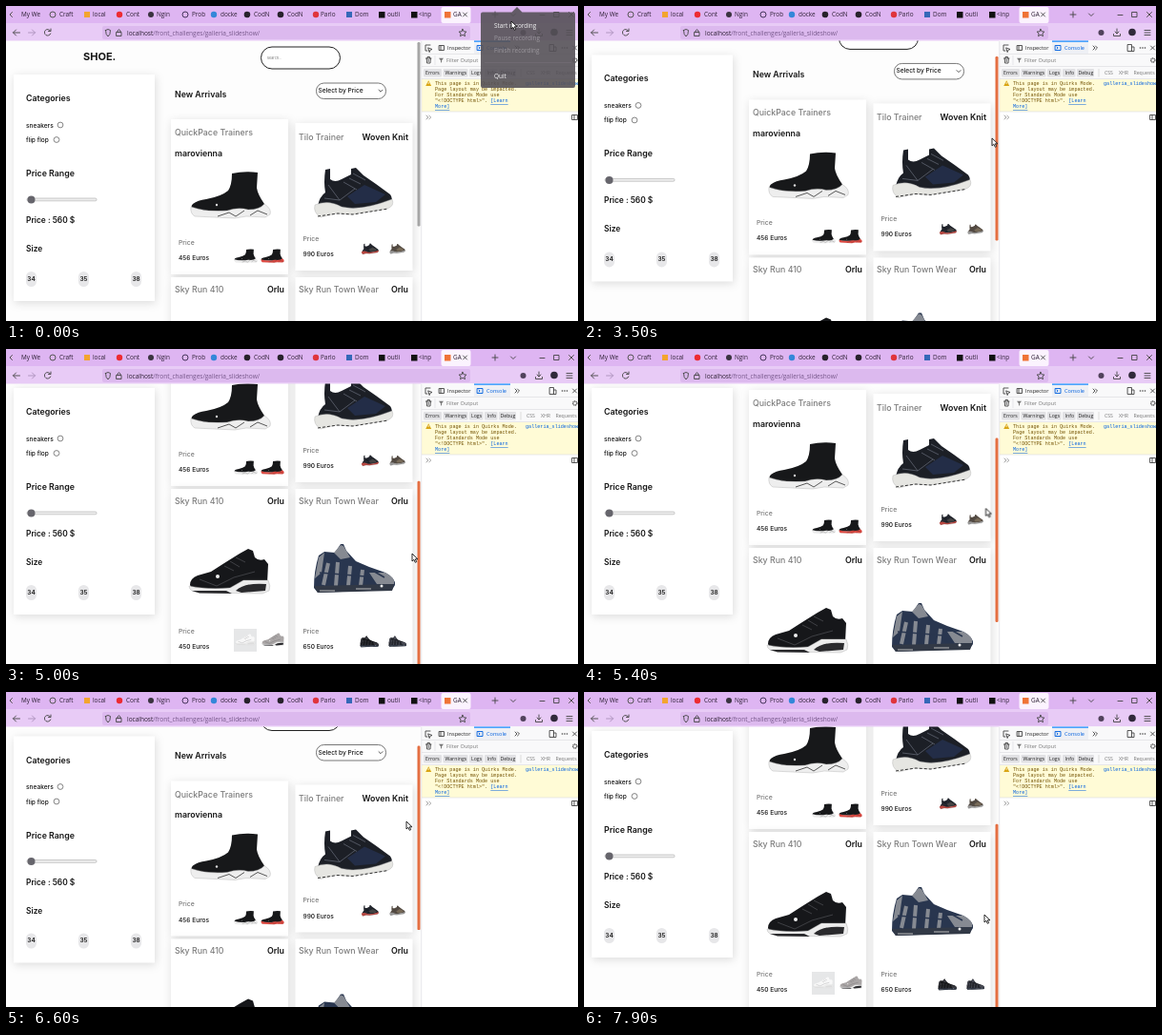
An HTML page for the animation above (8000 ms loop, 600 by 331 pixels).

```html
<!DOCTYPE html>
<html lang="en">
<head>
<meta charset="utf-8">
<title>Shoe shop</title>
<style>
@property --s { syntax: "<number>"; inherits: true; initial-value: 0; }
html, body { margin: 0; width: 600px; height: 331px; overflow: hidden; background: #fdfdfd; }
svg { display: block; animation: scroll 8s infinite; }
text { dominant-baseline: central; font: 6px "Open Sans", sans-serif; fill: #222; white-space: pre; }
.line { fill: none; stroke: #444; stroke-width: .9; stroke-linecap: round; }

/* shop page */
.shop text { font: 500 6.6px Inter, sans-serif; fill: #151515; }
.shop .h { font-size: 8.8px; font-weight: 600; }
.shop .name { font-size: 8.8px; fill: #7d7d7d; }
.shop .price { fill: #777; font-size: 6.8px; }
.shop .size { font-weight: 600; font-size: 6.4px; text-anchor: middle; }
.shop .r { text-anchor: end; }
.card { fill: #fff; filter: drop-shadow(1px 2px 5px #0002); }
.main { transform: translateY(calc(var(--s) * -1px)); }
.side { transform: translateY(max(-31px, calc(var(--s) * -1px))); }
.thumb { transform: translateY(calc(var(--s) * .73px)); animation: thumb 8s step-end infinite; }

/* browser */
.tabs text { font-size: 6.4px; fill: #2c1f33; }
.tools text { font-size: 5.6px; }
.tools .chip { font-size: 5.2px; }
.tools .dim { fill: #777; }
.tools .code { font: 5.12px "Liberation Mono", monospace; fill: #715100; }
.tools .link { fill: #0060df; }
.prompt { animation: prompt 8s step-end infinite; }
.edge { animation: edge 8s step-end infinite; }
.menu { animation: menu 8s step-end infinite; }
.menu text { font-size: 6.4px; fill: #f4f4f4; }
.menu .off { fill: #9b979d; }
.cursor { animation: move 8s infinite; }

@keyframes scroll {
  0% { --s: 0; }
  41.25% { --s: 0; animation-timing-function: steps(7); }
  50% { --s: 72; animation-timing-function: steps(7); }
  58.75% { --s: 138; }
  62.5% { --s: 138; animation-timing-function: steps(8); }
  72.5% { --s: 14; animation-timing-function: steps(2); }
  75% { --s: 0; }
  78.75% { --s: 0; animation-timing-function: steps(3); }
  82.5% { --s: 25.5; animation-timing-function: steps(11); }
  96.25%, 100% { --s: 138; }
}
@keyframes move {
  0% { transform: translate(530px, 16px); animation-timing-function: steps(9); }
  11.25% { transform: translate(440px, 62px); animation-timing-function: steps(5); }
  17.5% { transform: translate(30px, 215px); animation-timing-function: steps(4); }
  22.5% { transform: translate(224px, 196px); animation-timing-function: steps(2); }
  25% { transform: translate(264px, 179px); animation-timing-function: steps(7); }
  33.75% { transform: translate(428px, 140px); animation-timing-function: steps(5); }
  40% { transform: translate(428px, 124px); }
  41.25% { transform: translate(428px, 124px); animation-timing-function: steps(7); }
  50% { transform: translate(428px, 176px); animation-timing-function: steps(7); }
  58.75% { transform: translate(427px, 219px); }
  60% { transform: translate(427px, 219px); animation-timing-function: steps(2); }
  62.5% { transform: translate(426px, 215px); animation-timing-function: steps(8); }
  72.5% { transform: translate(417px, 120px); animation-timing-function: steps(2); }
  75% { transform: translate(418px, 112px); }
  78.75% { transform: translate(418px, 112px); animation-timing-function: steps(3); }
  82.5% { transform: translate(420px, 136px); animation-timing-function: steps(13); }
  98.75%, 100% { transform: translate(420px, 234px); }
}
@keyframes thumb { 0% { fill: #a6a6a6; } 2.5% { fill: #ee8866; } 35%, 100% { fill: #e46f42; } }
@keyframes prompt { 0% { stroke: #999; } 2.5% { stroke: #0074e8; } 35%, 100% { stroke: #999; } }
@keyframes edge { 0% { opacity: 0; } 2.5% { opacity: 1; } 42.5%, 100% { opacity: 0; } }
@keyframes menu { 0% { opacity: 1; } 2.5%, 100% { opacity: 0; } }
</style>
</head>
<body>
<svg width="600" height="331" viewBox="0 0 600 331">
<defs>
  <g id="sock">
    <path fill="#17181a" d="M45 2Q58-1 72 1L71 17Q72 24 79 34L80 42 4 41Q1 37 4 34 9 30 18 29 34 26 41 20 45 14 45 2Z"/>
    <path fill="var(--sole,#eee)" stroke="#aaa" stroke-width=".4" d="M2 37Q20 43 40 41 52 37 62 40 74 40 79 34 87 39 85 45L80 48 60 47 48 49 6 47Q1 44 2 37Z"/>
    <path fill="none" stroke="#333" stroke-width=".8" d="M30 47 42 43 49 47 58 41M64 46 72 41 82 45"/>
    <circle cx="29" cy="35" r="1.2" fill="#ddd"/>
  </g>
  <g id="runner">
    <path fill="var(--up,#1c1f26)" d="M5 40Q7 30 13 26 11 15 13 2L18 1 18 12Q23 16 30 12L40 7 40 1 45 0 53 8 66 17 81 28Q84 32 82 38L40 44Z"/>
    <path fill="var(--panel,#232d47)" d="M36 30 54 18 76 28 66 36 44 38Z"/>
    <path fill="none" stroke="#606571" stroke-width=".8" d="M38 11 50 17M32 15 46 23M42 6 55 13M16 18 28 34 44 22M12 32 28 34"/>
    <path fill="var(--sole,#e6e6e2)" stroke="#aaa" stroke-width=".4" d="M2 39Q16 33 30 41 50 46 83 33 86 40 78 43L40 49 24 48 8 52Q0 47 2 39Z"/>
    <path fill="none" stroke="#333" stroke-dasharray="3 2" d="M5 51 26 48 42 49 79 43"/>
  </g>
  <g id="low">
    <path fill="var(--up,#16171a)" d="M2 38Q2 31 10 28L24 24 38 15 54 5 63 0 68 2 70 9Q74 13 80 11L84 16 83 36 40 44 4 42Z"/>
    <path fill="none" stroke="#4a4b50" stroke-width=".8" d="M38 18 48 23M44 13 54 19M50 9 60 14M12 32 30 39 48 30 70 24"/>
    <path fill="var(--sole,#ececec)" stroke="#aaa" stroke-width=".4" d="M1 39Q20 43 44 41L58 33 84 33Q87 39 85 44L78 47 12 46Q1 45 1 39Z"/>
    <path fill="var(--air,#2a2a2d)" d="M50 44Q60 35 82 37L81 44 56 46ZM4 44 40 44 46 47 12 46.500Z"/>
    <circle cx="31" cy="29" r="2" fill="#eee"/>
  </g>
  <g id="high">
    <path fill="var(--up,#29364f)" d="M2 48Q2 30 7 14L13 10 24 11 30 2 33 2 36 9 46 20 60 26 77 32Q88 38 87 45L84 50 6 53Z"/>
    <path fill="var(--panel,#868a92)" d="M23 11 30 3 33 4 40 16 30 18ZM60 32 77 32Q88 38 86 44L68 44ZM7 16 13 11 10 32 3 38Z"/>
    <path fill="none" stroke="var(--panel,#868a92)" stroke-width="4" d="M12 45 17 22M25 46 27 21M38 46 40 25M51 46 53 29"/>
    <path fill="none" stroke="var(--up,#29364f)" stroke-width="1.500" d="M8 32 56 36M44 19 40 24M62 29 76 37"/>
    <path fill="#323946" d="M2 46 86 44 84 51 6 53Z"/>
    <path fill="none" stroke="#bbb" d="M8 51 24 51M46 49 62 49"/>
    <circle cx="73" cy="46" r="1.500" fill="#eee"/>
  </g>
</defs>

<rect width="600" height="331" fill="#fdfdfd"/>

<g class="shop">
  <g class="main">
    <text x="81" y="53" style="font-size:11px;font-weight:700">SHOE.</text>
    <rect x="267.5" y="43" width="83" height="23" rx="11.5" fill="#fff" stroke="#222"/>
    <text x="274" y="54.5" style="font-size:3.7px;fill:#888">search...</text>
    <text class="h" x="177" y="92">New Arrivals</text>
    <rect x="325.5" y="81" width="73" height="16.5" rx="8" fill="#fff" stroke="#555" stroke-width=".8"/>
    <text x="327.5" y="89">Select by Price</text>
    <path class="line" d="M391 88.2l2 2 2-2"/>

    <rect class="card" x="173" y="119" width="123" height="163"/>
    <text class="name" x="177" y="132.5">QuickPace Trainers</text>
    <text class="h" x="177" y="154">marovienna</text>
    <use href="#sock" x="192" y="174"/>
    <text class="price" x="181" y="248">Price</text>
    <text x="181" y="265">456 Euros</text>
    <use href="#sock" transform="translate(239 255.5) scale(.29)"/>
    <use href="#sock" transform="translate(267 255.5) scale(.29)" style="--sole:#e0473f"/>

    <rect class="card" x="303.5" y="123" width="123" height="155"/>
    <text class="name" x="307" y="137">Tilo Trainer</text>
    <text class="h r" x="422" y="137">Woven Knit</text>
    <use href="#runner" x="322" y="170"/>
    <text class="price" x="311.5" y="244">Price</text>
    <text x="311.5" y="261">990 Euros</text>
    <use href="#runner" transform="translate(372.5 249.5) scale(.22)" style="--sole:#b9453f;--panel:#444"/>
    <use href="#runner" transform="translate(402 250) scale(.2)" style="--up:#51483f;--panel:#776a58;--sole:#999"/>

    <rect class="card" x="173" y="285" width="123" height="200"/>
    <text class="name" x="177" y="297">Sky Run 410</text>
    <text class="h r" x="292" y="297">Orlu</text>
    <use href="#low" x="191" y="348"/>
    <text class="price" x="181" y="434.5">Price</text>
    <text x="181" y="451">450 Euros</text>
    <rect x="239" y="432" width="24" height="24" fill="#e6e7e8"/>
    <use href="#low" transform="translate(240.5 437.5) scale(.24)" style="--up:#f8f8f8;--air:#ddd"/>
    <use href="#low" transform="translate(268 436.5) scale(.28)" style="--up:#aaa6a6"/>

    <rect class="card" x="303.5" y="285" width="123" height="200"/>
    <text class="name" x="307" y="297">Sky Run Town Wear</text>
    <text class="h r" x="422" y="297">Orlu</text>
    <use href="#high" x="321" y="341"/>
    <text class="price" x="311.5" y="434.5">Price</text>
    <text x="311.5" y="451">650 Euros</text>
    <use href="#high" transform="translate(371 439) scale(.23)" style="--up:#17181b;--panel:#3a3a40"/>
    <use href="#high" transform="translate(401 439) scale(.22)" style="--up:#24262c;--panel:#4b4d57"/>
  </g>

  <g class="side">
    <rect class="card" x="8" y="72" width="148" height="238"/>
    <text class="h" x="21" y="96.5">Categories</text>
    <text x="21" y="125.5">sneakers</text>
    <text x="21" y="141">flip flop</text>
    <g fill="#fff" stroke="#666" stroke-width=".8">
      <circle cx="57" cy="125" r="2.9"/>
      <circle cx="53" cy="140.5" r="2.9"/>
      <rect x="22" y="202" width="73" height="2.8" rx="1.2" fill="#eee" stroke="#aaa" stroke-width=".6"/>
    </g>
    <text class="h" x="21" y="175.5">Price Range</text>
    <circle cx="26.5" cy="203.5" r="4" fill="#66656c"/>
    <text class="h" x="21" y="225" style="font-size:8.4px">Price : 560 $</text>
    <text class="h" x="21" y="255" style="font-size:8.4px">Size</text>
    <g fill="#e7e7e9">
      <rect x="21" y="279" width="11" height="16" rx="5.5"/>
      <rect x="76" y="279" width="11" height="16" rx="5.5"/>
      <rect x="131" y="279" width="11" height="16" rx="5.5"/>
    </g>
    <text class="size" x="26.5" y="286.5">34</text>
    <text class="size" x="81.5" y="286.5">35</text>
    <text class="size" x="136.5" y="286.5">38</text>
  </g>
  <rect class="thumb" x="431.5" y="38" width="3" height="193.5" rx="1.2"/>
</g>

<g class="tabs">
  <rect width="600" height="18" fill="#deb5f2"/>
  <rect y="18" width="600" height="18.5" fill="#e8cbf6"/>
  <rect x="456.500" y="1" width="31" height="17" rx="2" fill="#fbf3fe"/>
  <path class="line" d="M6.5 6.500l-2.500 2.500 2.500 2.500M479.500 7l4 4m0-4l-4 4M510 9h6m-3-3v6M529.500 8l2.500 2.500 2.500-2.500M560 9.500h5M575 6.500h5v5h-5zM590.500 6.500l5 5m0-5l-5 5"/>
  <text x="16" y="8.700">My We</text>
  <circle cx="49" cy="9" r="3" fill="none" stroke="#555"/><text x="56" y="8.700">Craft</text>
  <rect x="82" y="6" width="6" height="6" fill="#f3a52f"/><text x="91" y="8.700">local</text>
  <circle cx="119" cy="9" r="3.200" fill="#ed2b32"/><text x="126" y="8.700">Cont</text>
  <circle cx="152" cy="9" r="3" fill="#3a3340"/><text x="158" y="8.700">Ngin</text>
  <circle cx="188" cy="9" r="3" fill="none" stroke="#45345a"/><text x="195" y="8.700">Prob</text>
  <circle cx="218" cy="9" r="3.200" fill="#3487d9"/><text x="225" y="8.700">docke</text>
  <circle cx="253" cy="9" r="3.300" fill="#27212b"/><text x="260" y="8.700">CodN</text>
  <circle cx="288" cy="9" r="3.300" fill="#27212b"/><text x="295" y="8.700">CodN</text>
  <circle cx="325" cy="9" r="3.200" fill="#e0343c"/><text x="330" y="8.700">Parlo</text>
  <rect x="357" y="6" width="6" height="6" fill="#3568b8"/><text x="366" y="8.700">Dom</text>
  <rect x="391" y="6" width="6.500" height="6.500" fill="#111"/><text x="400" y="8.700">outli</text>
  <rect x="425" y="6" width="6.500" height="6.500" fill="#111"/><text x="433" y="8.700">&lt;inp</text>
  <rect x="460" y="6" width="6.500" height="6.500" fill="#ef7336"/><text x="469" y="8.700">GA</text>

  <rect x="101" y="21" width="386" height="14" rx="2" fill="#dcb9ee"/>
  <path class="line" d="M14.500 28h-7l3-3m-3 3l3 3M46.500 26a3.300 3.300 0 1 0 .3 3M47 24v2.500h-2.500"/>
  <path class="line" style="stroke:#aa8fba" d="M23.500 28h7l-3-3m3 3l-3 3"/>
  <path class="line" d="M104.500 25.500l2.500-1 2.500 1q0 5-2.500 6.500-2.500-1.500-2.500-6.500zM116 27.500h5v4h-5zM117 27.500v-1.500q1.500-2.500 3 0v1.500"/>
  <text x="127" y="28" style="font-size:6.5px">localhost<tspan fill="#76578a">/front_challenges/galleria_slideshow/</tspan></text>
  <path class="line" d="M479 24.300l1.200 2.500 2.700.3-2 1.900.6 2.700-2.500-1.400-2.500 1.400.6-2.700-2-1.900 2.700-.3z"/>
  <circle cx="542.5" cy="28" r="3" fill="#51425c"/>
  <path class="line" d="M559 24v5m-2-2l2 2 2-2M555.500 29.500v2h7v-2M588 25.500h6m-6 2.500h6m-6 2.500h6"/>
  <circle cx="575" cy="27.500" r="3.800" fill="#30293a"/>
</g>

<g class="tools">
  <rect x="435.5" y="36.5" width="164.5" height="294.5" fill="#fff"/>
  <rect x="436" y="36.5" width="164" height="40" fill="#f9f9fa"/>
  <rect x="491" y="37" width="38" height="13" fill="#eef0f5"/>
  <rect x="491" y="36.500" width="38" height="1.200" fill="#0a84ff"/>
  <rect x="436" y="77" width="164" height="34" fill="#fffbd6"/>
  <path fill="none" stroke="#dedee2" stroke-width=".7" d="M435.700 37V331M436 50.500H600M436 63.500H600M436 76.500H600M436 111H600M450 52V62"/>
  <path class="line" d="M445 41h-5v6h2m1-3l4 1.500-2 .7-.7 2zM454.500 41.500h5v5h-5zM456 41.500v5M534 42l2 2-2 2m2.500-4l2 2-2 2M570.500 40.500h4v7h-4zM574.500 43h2.500v4.500H574.500M594.500 42l4 4m0-4l-4 4"/>
  <g fill="#444"><circle cx="583.5" cy="44" r=".8"/><circle cx="586" cy="44" r=".8"/><circle cx="588.500" cy="44" r=".8"/></g>
  <path class="line" style="stroke:#0060df" d="M494.500 41.500h5.500v5h-5.500zM496 43l1.200 1-1.200 1"/>
  <text x="463" y="44">Inspector</text>
  <text class="link" x="504" y="44">Console</text>
  <path class="line" d="M440.500 55h5.500M442 54.800v-1.300h2.500v1.300M441.200 55.300l.4 4.700h3.400l.4-4.700M443.200 56.500v2"/>
  <path fill="#777" d="M454 54.800h5l-2 2.500v2.500l-1-.7v-1.800z"/>
  <text class="dim" x="462" y="57">Filter Output</text>
  <circle cx="596.8" cy="57" r="2.100" fill="none" stroke="#555" stroke-width="1.300" stroke-dasharray="1.200 .4"/>
  <g fill="#e1e1e4">
    <rect x="438" y="66" width="19" height="8.500" rx="1"/>
    <rect x="458.5" y="66" width="26" height="8.500" rx="1"/>
    <rect x="486" y="66" width="14.500" height="8.500" rx="1"/>
    <rect x="502" y="66" width="13.500" height="8.500" rx="1"/>
    <rect x="517" y="66" width="18" height="8.500" rx="1"/>
  </g>
  <path fill="none" stroke="#ccc" stroke-width=".6" d="M540 66v8.500"/>
  <text class="chip" x="440" y="70.200">Errors</text>
  <text class="chip" x="460.5" y="70.200">Warnings</text>
  <text class="chip" x="488" y="70.200">Logs</text>
  <text class="chip" x="504.5" y="70.200">Info</text>
  <text class="chip" x="518.500" y="70.200">Debug</text>
  <text class="chip dim" x="546" y="70.200">CSS</text>
  <text class="chip dim" x="561" y="70.200">XHR</text>
  <text class="chip dim" x="576.5" y="70.200">Requests</text>

  <path fill="#d9a514" d="M443.200 78.300l3 5.600h-6z"/>
  <path stroke="#fff" stroke-width=".7" d="M443.200 80v2"/>
  <text class="code" x="450" y="81.500">This page is in Quirks Mode.</text>
  <text class="code" x="450" y="87.700">Page layout may be impacted.</text>
  <text class="code" x="450" y="93.900">For Standards Mode use</text>
  <text class="code" x="450" y="100.100">"&lt;!DOCTYPE html&gt;". <tspan class="link" text-decoration="underline">[Learn</tspan></text>
  <text class="code link" x="450" y="106.300" text-decoration="underline">More]</text>
  <text class="code link" x="545" y="81.500">galleria_slideshow</text>
  <path class="line prompt" d="M441 115l2 2-2 2m2.700-4l2 2-2 2"/>
  <path class="line" d="M594 114.500h5.500v5H594zM596 114.500v5"/>
</g>

<rect class="edge" y="329.700" width="600" height="1.300" fill="#ef8c6c"/>

<g class="menu">
  <path fill="#565158" fill-opacity=".9" d="M500 6.500h30.500l5.500-5.500 5.500 5.500H595q2 0 2 2V84q0 2-2 2H500q-2 0-2-2V8.500q0-2 2-2z"/>
  <path stroke="#77717a" stroke-width=".6" d="M502 59.500H593"/>
  <text x="512" y="20">Start recording</text>
  <text class="off" x="512" y="33.300">Pause recording</text>
  <text class="off" x="512" y="46.500">Finish recording</text>
  <text x="512" y="73">Quit</text>
</g>

<path class="cursor" fill="#fff" stroke="#111" stroke-width=".9" d="M0 0V8L1.900 6.300 3.300 9.300 4.700 8.600 3.300 5.800H6Z"/>
</svg>
</body>
</html>
```
